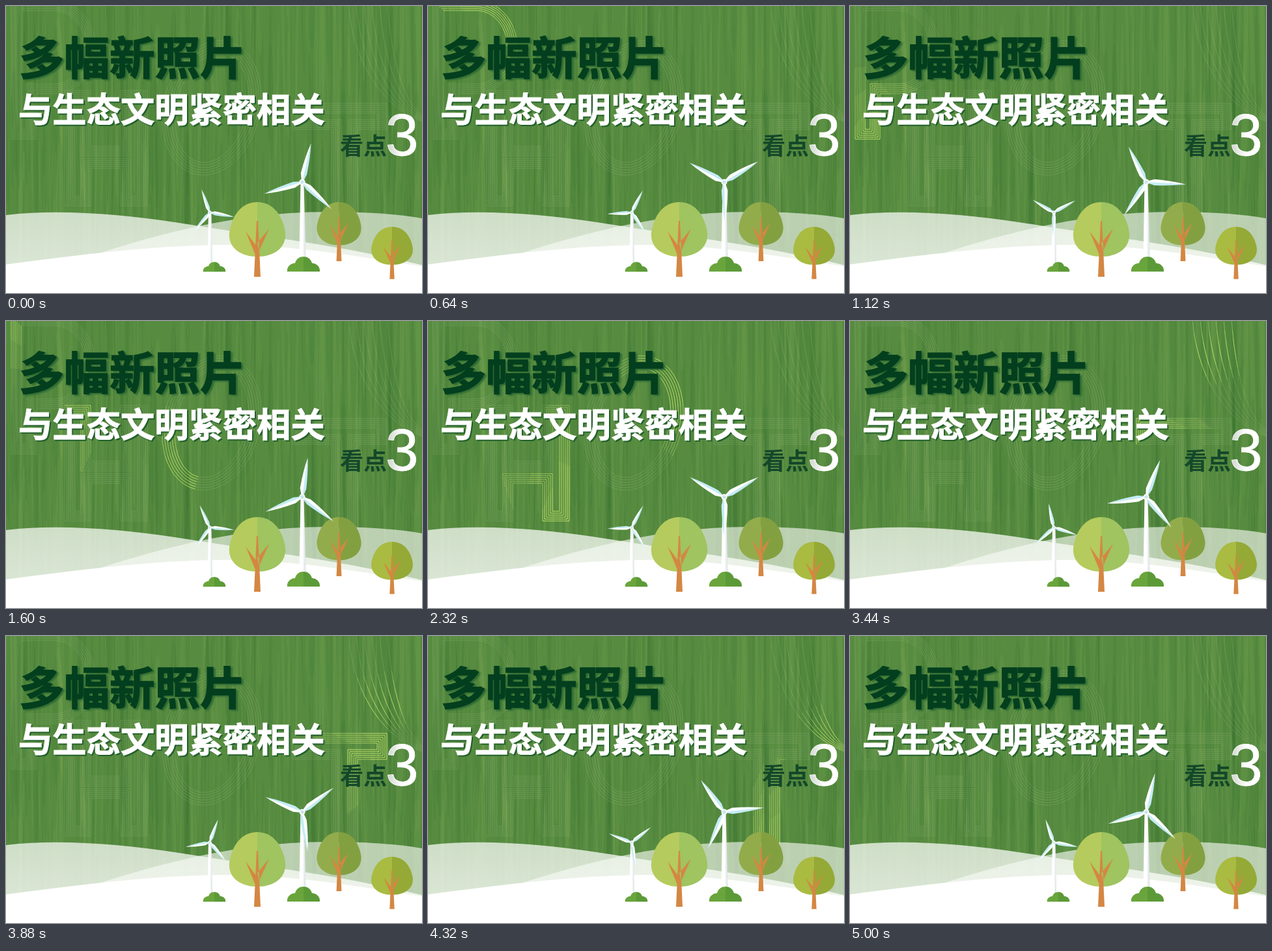
Recreate the animation shown at these times as an HTML page with a canvas. Size 639 px wide and 442 px high, loop 5040 ms.

```html
<!DOCTYPE html>
<html lang="zh-CN">
<head>
<meta charset="utf-8">
<style>
  html, body { margin: 0; width: 100%; height: 100%; overflow: hidden; background: #568b40; }
  canvas, svg { position: absolute; left: 0; top: 0; width: 100vw; height: 100vh; }
  text { font-family: "Noto Sans CJK SC", "Noto Sans CJK", sans-serif; font-weight: 900; }
  .title { font-size: 69.5px; fill: #033f1e; stroke: #033f1e; stroke-width: 1.5; filter: drop-shadow(3px 2px 1px #2f6b33); }
  .sub { font-size: 52.3px; fill: #fff; stroke: #fff; filter: drop-shadow(2.5px 2.5px .6px #23602c); }
  .label { font-size: 36px; font-weight: 700; fill: #14482a; }
  .digit { font: 91px "Liberation Sans", Arial, sans-serif; fill: url(#shade); stroke: #fff; stroke-width: .8; }
  #letters path { fill: none; stroke: #dcebc4; stroke-opacity: .2; stroke-width: .8; }
  #letters .glow { stroke: #d6f268; stroke-opacity: .27; stroke-width: 1; }
</style>
</head>
<body>
<canvas id="grain" width="639" height="442"></canvas>
<svg viewBox="0 0 639 442" preserveAspectRatio="none">
  <defs>
    <linearGradient id="hill" x2="0" y2="1">
      <stop stop-color="#f4f8f1" stop-opacity=".76"/>
      <stop offset="1" stop-color="#fff" stop-opacity=".82"/>
    </linearGradient>
    <linearGradient id="shade">
      <stop stop-color="#c9cfc6"/><stop offset=".5" stop-color="#fff"/>
    </linearGradient>
    <linearGradient id="pole">
      <stop offset=".5" stop-color="#fff"/><stop offset="1" stop-color="#d5dfe2"/>
    </linearGradient>
    <g id="rotor">
      <g id="blade">
        <path d="M-1 0L-5-13Q-4-40 .5-61L1 0Z" fill="#fff"/>
        <path d="M1 0L4.5-13Q4-40 .5-61L0-10Z" fill="#c4ecf4"/>
      </g>
      <use href="#blade" transform="rotate(120)"/>
      <use href="#blade" transform="rotate(240)"/>
      <circle r="4.5" fill="#fff"/><circle r="2.8" fill="#c9e6ee"/>
    </g>
    <path id="crown" d="M0-43C-24-43-39-23-43 4C-45 28-25 41 0 41Z"/>
    <path id="trunk" fill="#d48743" d="M-1-14H1L5 72H-5ZM-3 38L-18 2L1 28ZM3 32L18-2L0 20Z"/>
    <path id="bush" d="M0-12C-6-12-11-9-13-2C-18-2-26 2-25 11H0Z"/>
  </defs>

  <g id="letters"></g>

  <path d="M60 410C220 350 360 317 494 317Q580 317 639 327V442H60Z" fill="#f0f5ec" fill-opacity=".66"/>
  <path d="M0 322C100 310 220 326 305 340S510 368 639 399V442H0Z" fill="url(#hill)"/>
  <path d="M0 398C110 384 220 369 330 368S540 386 639 401V442H0Z" fill="#fff"/>

  <text class="title" x="20" y="106">多幅新照片</text>
  <text class="sub" x="19" y="179">与生态文明紧密相关</text>
  <text class="label" x="513" y="229">看点</text>
  <text class="digit" x="583" y="230">3</text>

  <g id="trees"></g>
  <path d="M311 318H315.5L317 397H309.5Z" fill="url(#pole)"/>
  <path d="M452.5 271H457.5L460.5 390H450.5Z" fill="url(#pole)"/>
  <use href="#rotor" id="small"/>
  <use href="#rotor" id="large"/>
  <g id="bushes"></g>
</svg>
<script>
const $ = id => document.getElementById(id);

// Brushed green backdrop
let seed = 11;
const rnd = () => (seed = seed * 16807 % 2147483647) / 2147483647;
const ctx = $('grain').getContext('2d');
ctx.fillStyle = '#568b40';
ctx.fillRect(0, 0, 639, 442);
for (let i = 0; i < 520; i++) {
  ctx.fillStyle = rnd() < .5 ? 'rgba(150,182,100,.09)' : 'rgba(38,95,40,.09)';
  ctx.beginPath();
  ctx.ellipse(rnd() * 639, rnd() * 400, .6 + rnd() * rnd() * 6, 25 + rnd() * 150, rnd() * .06 - .03, 0, 7);
  ctx.fill();
}

// Nested letter outlines, inset by d, each with a light travelling along it
function oval(x, y, rx, ry, tilt) {
  const a = tilt * Math.PI / 180, dx = -ry * Math.sin(a), dy = ry * Math.cos(a);
  const arc = `A${rx} ${ry} ${tilt} 0 1 `;
  return `M${x + dx} ${y + dy}${arc}${x - dx} ${y - dy}${arc}${x + dx} ${y + dy}`;
}
const letters = [
  { start: 280, span: 1450, shape: d => `M${8 + d} ${d - 8}H75A${62 - d} ${71.5 - d} 0 0 1 75 ${135 - d}H${46 - d}V${205 - d}H${8 + d}Z` },
  { start: 1450, span: 1700, shape: d => `M${90 + d} ${130 + d}H${130 - d}V${216 + d}H${176 + d}V${130 + d}H${217 - d}V${308 - d}H${176 + d}V${250 - d}H${130 - d}V${308 - d}H${90 + d}Z` },
  { start: 1250, span: 1900, shape: d => oval(316, 157, 74 - d * 1.3, 105 - d * 1.3, 14) },
  { start: 2690, span: 2300, shape: d => `M${526 + 4 * d} -5C${530 + 4 * d} 60 ${560 + 3 * d} 150 645 ${180 - d / 2}` },
  { start: 3150, span: 2000, shape: d => `M${440 + d} ${190 - d}V${150 + d}H${585 - d}V${190 - d}H${540 - d}V${330 - d}H${500 + d}V${190 - d}Z` }
];
const lengths = [.44, .3, .16];
const addPath = (d, cls) => {
  const p = document.createElementNS('http://www.w3.org/2000/svg', 'path');
  p.setAttribute('d', d);
  p.setAttribute('pathLength', 1);
  p.setAttribute('class', cls);
  return $('letters').appendChild(p);
};
for (const letter of letters) {
  letter.glows = [];
  for (let i = 0; i < 6; i++) {
    const d = letter.shape(i * 3);
    addPath(d, 'line');
    for (const len of lengths) {
      const path = addPath(d, 'glow');
      path.style.strokeDasharray = `${len} 3`;
      letter.glows.push({ path, len });
    }
  }
}

// Two-tone plants: x, y, scale x, scale y, left colour, right colour
const plant = (half, extra) => ([x, y, sx, sy, left, right]) =>
  `<g transform="translate(${x} ${y}) scale(${sx} ${sy})">
  <use href="${half}" fill="${left}"/><use href="${half}" fill="${right}" transform="scale(-1 1)"/>${extra}</g>`;
$('trees').innerHTML = [
  [511.5, 336, .79, .79, '#92ac4b', '#83a041'],
  [386, 345, 1, 1, '#b5cb5d', '#9fc460'],
  [593, 370, .74, .7, '#a9bb40', '#95a936']
].map(plant('#crown', '<use href="#trunk"/>')).join('');
$('bushes').innerHTML = [
  [320, 402, .69, .65, '#69a53c', '#5c9a38'],
  [457, 398, 1, 1, '#69a53c', '#5c9a38']
].map(plant('#bush', '')).join('');

function draw(now) {
  const t = Math.floor(now % 5040 / 40) * 40;
  const turn = t * 360 / 5000;
  $('large').setAttribute('transform', `translate(455 271) rotate(${12.4 + turn})`);
  $('small').setAttribute('transform', `translate(313 318) rotate(${turn - 20}) scale(.62)`);
  for (const { start, span, glows } of letters) {
    const p = (t - start) / span;
    const on = p > 0 && p < 1 && t < 5000;
    const centre = -.22 + 1.44 * p;
    for (const { path, len } of glows) {
      path.style.display = on ? '' : 'none';
      path.style.strokeDashoffset = len / 2 - centre;
    }
  }
  requestAnimationFrame(draw);
}
requestAnimationFrame(draw);
</script>
</body>
</html>
```
